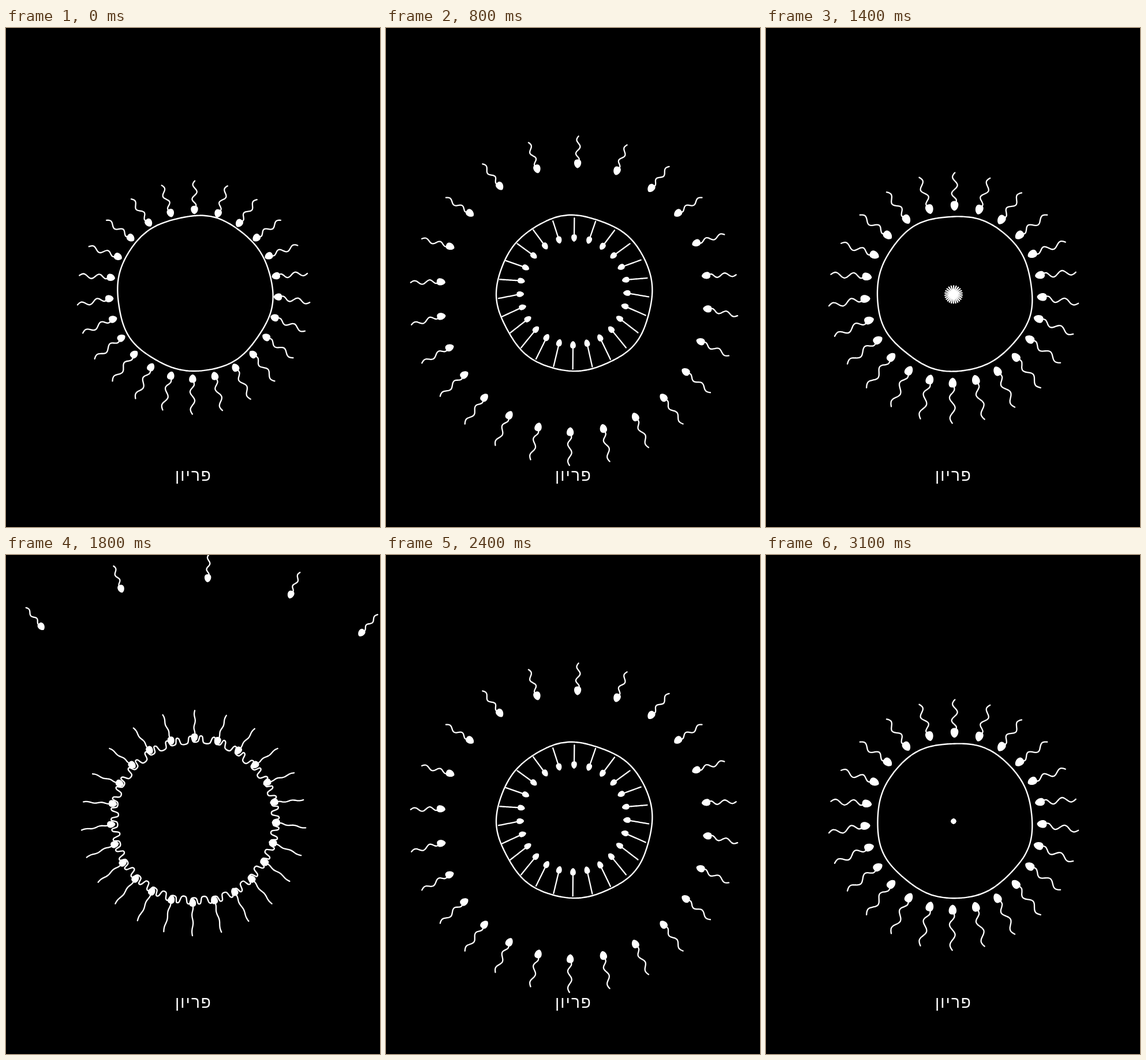
An HTML page with a canvas that plays this animation: 648x864 px, repeating every 3200 ms.

```html
<!DOCTYPE html>
<html lang="he">
<head>
<meta charset="utf-8">
<style>
  html, body { margin: 0; width: 100%; height: 100%; overflow: hidden; background: #000; }
  canvas { position: absolute; left: 0; top: 0; }
  p {
    position: absolute; left: 0; top: 753px; width: 650px; margin: 0;
    font: 300 28px/40px "Open Sans", "DejaVu Sans", sans-serif;
    letter-spacing: 2px; text-align: center; color: #fff; direction: rtl;
  }
</style>
</head>
<body>
<p>פריון</p>
<canvas id="stage" width="648" height="864"></canvas>
<script>
const ctx = document.getElementById('stage').getContext('2d');
const FRAME = 100, FRAMES = 16, CYCLE = FRAME * FRAMES;
const SWIMMERS = 24, MERGE = 1500, ARRIVE = 1100;
const CENTER = { x: 325, y: 461 };
const CELL = { x: 327, y: 459.5, r: 134.5 };
const HOME_PULL = 2.4, FAR_PULL = 9;

// Left half of a membrane fold as [sideways, outward]; one stage every 200 ms.
const FLAT = [[-14, 0], [-10, 0], [-6, 0], [-2, 0]];
const CUP = [[-14, 0], [-11, 10], [-7, 11], [-4, 2]];
const LOOP = [[-10, 0], [-7, 4], [-8, 11], [-4, 15]];
const WAVE = [[-15, 0], [-10, 2], [-6, 5], [-2, 8]];
const FOLDS = [FLAT, CUP, LOOP, WAVE, FLAT];

const mix = (a, b, k) => a + (b - a) * k;
const rad = degrees => degrees * Math.PI / 180;
const polar = (c, angle, r) => [c.x + r * Math.sin(angle), c.y - r * Math.cos(angle)];

// Clockwise angle from the top; a stronger pull crowds the swimmers downwards.
function heading(i, pull) {
  const a = i / SWIMMERS * 2 * Math.PI;
  return a + rad(pull * (Math.sin(a) + .25 * Math.cos(2 * a)) + 1.4 * Math.sin(2 * a));
}

// Catmull-Rom curve through the points
function curve(points, closed) {
  const n = points.length;
  const at = i => closed ? points[(i + n) % n] : points[Math.max(0, Math.min(n - 1, i))];
  ctx.beginPath();
  ctx.moveTo(...points[0]);
  for (let i = 0; i < (closed ? n : n - 1); i++) {
    const [a, b, c, d] = [at(i - 1), at(i), at(i + 1), at(i + 2)];
    ctx.bezierCurveTo(b[0] + (c[0] - a[0]) / 6, b[1] + (c[1] - a[1]) / 6,
      c[0] - (d[0] - b[0]) / 6, c[1] - (d[1] - b[1]) / 6, c[0], c[1]);
  }
  ctx.stroke();
}

function swimmer({ center, angle, radius, tail, wave, length, width, side }) {
  ctx.save();
  ctx.translate(...polar(center, angle, radius));
  ctx.rotate(angle);

  // The tail points outwards, along negative y.
  ctx.save();
  ctx.rotate(rad(8 * Math.sin(angle)));
  const reach = tail * (1 - .1 * Math.cos(angle));
  const points = [];
  for (let u = 0; u <= 1; u += 1 / 16) {
    const sway = side * wave * Math.sin(u * Math.PI * 4) * Math.min(1, u * 4) * (1.1 - .4 * u);
    points.push([sway, -reach * u]);
  }
  ctx.lineWidth = 2.3;
  curve(points, false);
  ctx.restore();

  const l = length / 2;
  ctx.beginPath();
  ctx.moveTo(0, l);
  ctx.bezierCurveTo(-width * .6, l * .75, -width * .78, -l * 1.1, 0, -l);
  ctx.bezierCurveTo(width * .78, -l * 1.1, width * .6, l * .75, 0, l);
  ctx.fill();
  ctx.restore();
}

function membrane(t) {
  const stage = Math.min(t / 200, FOLDS.length - 1.001);
  const from = FOLDS[Math.floor(stage)], to = FOLDS[Math.floor(stage) + 1];
  const half = from.map((p, i) => p.map((v, axis) => mix(v, to[i][axis], stage % 1)));
  const fold = half.concat(half.map(([u, v]) => [-u, v]).reverse());
  const points = [];
  for (let i = 0; i < SWIMMERS; i++) {
    for (const [u, v] of fold) {
      const a = heading(i, HOME_PULL) + u / CELL.r;
      const wobble = Math.sin(a * 5 + t / 300) + .8 * Math.sin(a * 8 - t / 200);
      points.push(polar(CELL, a, CELL.r + v + wobble));
    }
  }
  ctx.lineWidth = 2.4;
  curve(points, true);
}

// The ring that pushes through the membrane and merges into one dot
function innerRing(t) {
  const progress = t / MERGE;
  return {
    pull: HOME_PULL,
    center: { x: CENTER.x, y: CENTER.y - 5 * Math.sin(Math.PI * progress) },
    radius: Math.max(0, Math.min(146 - .016 * t, 123 - .153 * (t - 600))),
    tail: 56 * Math.sqrt(1 - progress),
    wave: Math.max(0, 4.6 * (1 - t / 270)),
    length: 14.5 - 6 * progress ** 2,
    width: 12 - 5 * progress
  };
}

// The next ring, gathering from outside the stage
function outerRing(t) {
  const away = Math.max(0, (ARRIVE - t) / 900);
  const far = Math.min(1, away * 1.8);
  return {
    pull: mix(HOME_PULL, FAR_PULL, far),
    center: { x: CENTER.x + 6 * away ** 2, y: CENTER.y + 54 * away ** 2 },
    radius: 153 + 322 * away ** 1.28,
    tail: mix(64, 46, far),
    wave: mix(5.5, 3, far),
    length: mix(17, 14, far),
    width: mix(13, 11, far)
  };
}

function draw(t) {
  ctx.clearRect(0, 0, 648, 864);
  ctx.strokeStyle = ctx.fillStyle = '#fff';
  ctx.lineCap = ctx.lineJoin = 'round';
  membrane(t);
  const rings = t > 0 ? [innerRing(t), outerRing(t)] : [innerRing(t)];
  for (const ring of rings) {
    for (let i = 0; i < SWIMMERS; i++) {
      swimmer({ ...ring, angle: heading(i, ring.pull), side: i < 5 ? 1 : -1 });
    }
  }
}

const start = performance.now();
function tick() {
  const elapsed = (performance.now() - start) % CYCLE;
  draw(Math.floor(elapsed / FRAME) * FRAME);
  requestAnimationFrame(tick);
}
tick();
</script>
</body>
</html>
```
